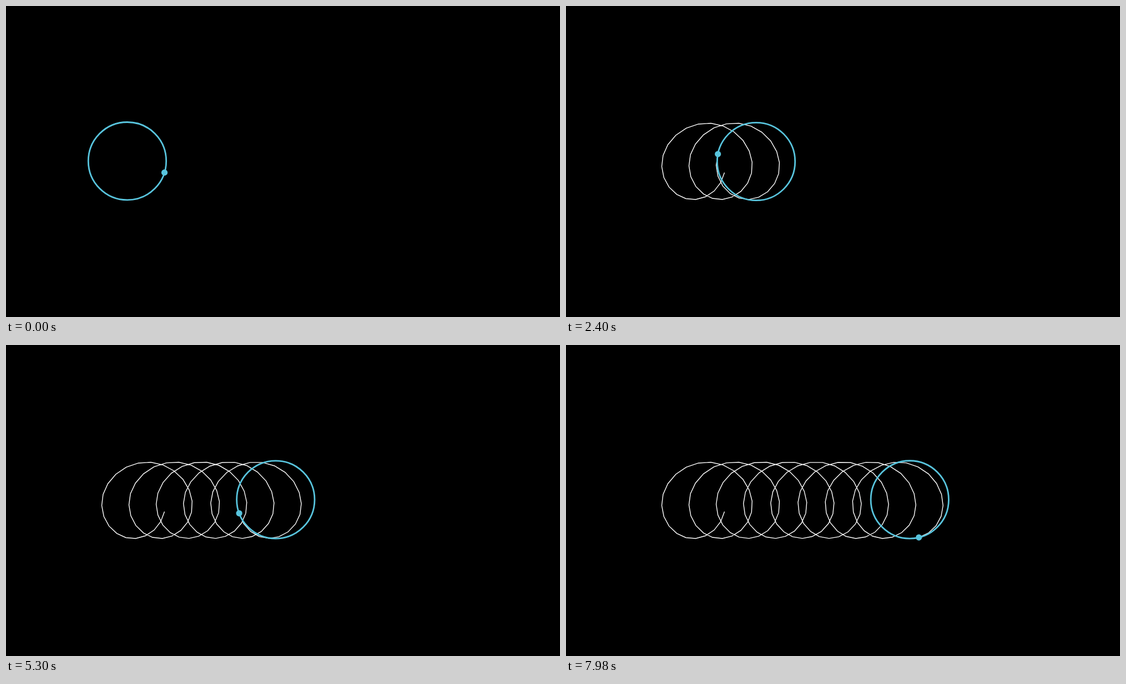
Animation, 998 px wide and 561 px high, one loop 8000 ms. Source, as an HTML page:

```html
<!DOCTYPE html>
<html lang="en">
<head>
<meta charset="utf-8">
<title>Sliding wheel</title>
<style>
  html, body { margin: 0; width: 100%; height: 100%; overflow: hidden; background: #000; }
  svg { display: block; width: 100%; height: 100%; }
</style>
</head>
<body>
<svg viewBox="0 0 998 561">
  <path id="trail" fill="none" stroke="#fff" stroke-width="1.4"/>
  <circle id="wheel" r="70.17" fill="none" stroke="#58c4dd" stroke-width="2.8"/>
  <circle id="dot" r="5.61" fill="#58c4dd"/>
</svg>
<script>
const UNIT = 70.17, STEP = 0.3, SHIFT = UNIT / 30, DOT = 0.08;
const LOOP = 8000, COUNT = 172;
const [trail, wheel, dot] = ['trail', 'wheel', 'dot'].map(id => document.getElementById(id));

// Half width of a unit octagon turned by angle a
function halfWidth(a) {
  const eighth = Math.PI / 4;
  return Math.cos(a - eighth * Math.round(a / eighth));
}

// How far the dot moves the middle of the bounding box along one axis;
// wheel and dot are both measured by eight points on their rims
function overhang(a) {
  const half = halfWidth(a), c = Math.cos(a);
  return Math.sign(c) * Math.max(0, Math.abs(c) + DOT * half - half) / 2 * UNIT;
}

// The wheel turns about the middle of its bounding box, so its centre wobbles
function simulate() {
  const poses = [];
  const cos = Math.cos(STEP), sin = Math.sin(STEP);
  let x = 499 - 4 * UNIT, y = 280.5;
  for (let i = 0; i < COUNT; i++) {
    const a = i * STEP, next = a + STEP;
    const ox = overhang(a), oy = overhang(a - Math.PI / 2);
    x += ox - (ox * cos - oy * sin) + (i ? SHIFT : 0);
    y += oy - (ox * sin + oy * cos);
    poses.push({ x, y, px: x + UNIT * Math.cos(next), py: y + UNIT * Math.sin(next) });
  }
  return poses;
}

const poses = simulate();
const points = poses.map(p => p.px.toFixed(2) + ' ' + p.py.toFixed(2));

// Steps come in threes lasting 20, 100 and 20 ms
function stepAt(t) {
  const r = t % 140;
  return Math.floor(t / 140) * 3 + (r < 20 ? 0 : r < 120 ? 1 : 2);
}

function place(node, x, y) {
  node.setAttribute('cx', x);
  node.setAttribute('cy', y);
}

function draw(t) {
  const n = Math.min(stepAt(t), COUNT - 1), p = poses[n];
  trail.setAttribute('d', 'M' + points.slice(0, n + 1).join('L'));
  place(wheel, p.x, p.y);
  place(dot, p.px, p.py);
}

const start = performance.now();
function tick() {
  draw((performance.now() - start) % LOOP);
  requestAnimationFrame(tick);
}
tick();
</script>
</body>
</html>
```
